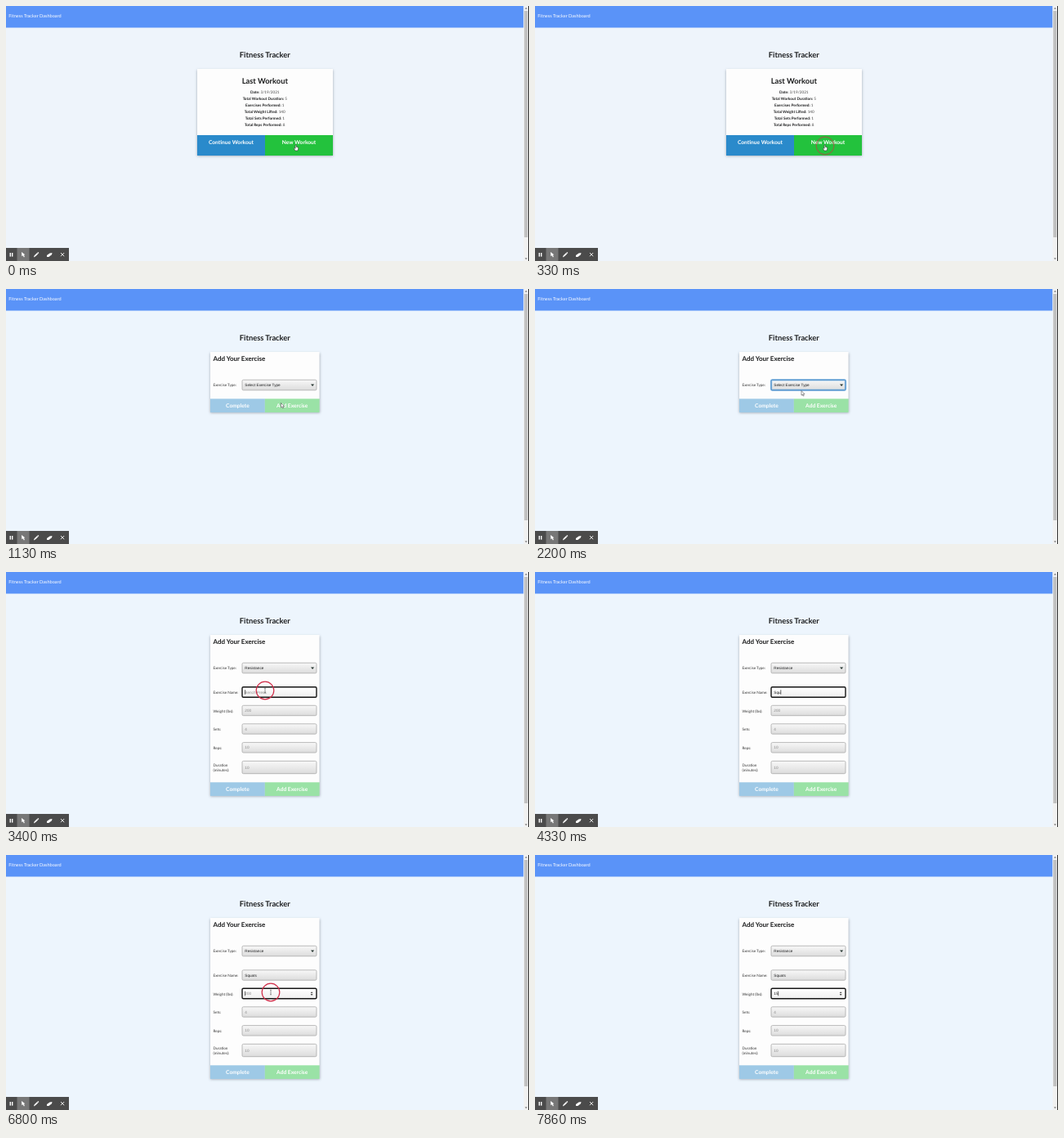
Animation, 640 px wide and 312 px high, one loop 8000 ms. Source, as an HTML page with a canvas:

```html
<!DOCTYPE html>
<html lang="en">
<head>
<meta charset="utf-8">
<title>Fitness Tracker</title>
<style>
html, body { margin: 0; width: 100%; height: 100%; overflow: hidden; background: #edf5fd; }
canvas { display: block; width: 640px; height: 312px; }
</style>
</head>
<body>
<canvas id="stage"></canvas>
<script>
const W = 640, H = 312, LOOP = 8000;
const canvas = document.getElementById('stage');
const ratio = window.devicePixelRatio || 1;
canvas.width = W * ratio;
canvas.height = H * ratio;
const ctx = canvas.getContext('2d');
ctx.scale(ratio, ratio);
if ('textRendering' in ctx) ctx.textRendering = 'geometricPrecision';

const LATO = 'Lato, sans-serif', ARIAL = '"Liberation Sans", Arial, sans-serif';
const INK = '#1b1c1d', BLUE = '#2a8acb', GREEN = '#23c23d';
const BLINK = 530;

// [time, x, y, shape]; the pointer glides between neighbouring keys
const pointerKeys = [
  [0, 355, 170, 'hand'], [1000, 355, 170, 'arrow'], [1130, 336.5, 139.5, 'arrow'],
  [1400, 326, 118, 'arrow'], [2000, 326, 118, 'arrow'], [2200, 326, 124.5, 'arrow'],
  [3130, 326, 124.5, 'arrow'], [3200, 317, 145, 'beam'], [4130, 0, 0, null],
  [6530, 318, 152, 'beam'], [6600, 324, 168, 'beam'], [7660, 0, 0, null]
];
const clicks = [[60, 355, 171, 400], [1800, 326, 118, 200], [3400, 317, 145, 200], [6800, 324, 168, 200]];
const nameKeys = [[3400, ''], [4130, 'S'], [4200, 'Sq'], [4330, 'Squ'], [4660, 'Squa'], [5060, 'Squat'], [5800, 'Squats']];
const weightKeys = [[6800, ''], [7660, '1'], [7860, '15']];

const clamp = v => Math.max(0, Math.min(1, v));
const latest = (keys, t) => keys.filter(k => k[0] <= t).pop();

function rect(x, y, w, h, fill) {
  ctx.fillStyle = fill;
  ctx.fillRect(x, y, w, h);
}

// cy is the middle of the capitals
function text(str, x, cy, size, { color = INK, weight = 400, align = 'left', family = LATO } = {}) {
  ctx.font = `${weight} ${size}px ${family}`;
  ctx.textAlign = align;
  ctx.fillStyle = color;
  ctx.fillText(str, x, cy + size * 0.36);
  return ctx.measureText(str).width;
}

function poly(points, fill, stroke, width = 0.7) {
  ctx.beginPath();
  points.forEach(([x, y]) => ctx.lineTo(x, y));
  ctx.closePath();
  if (fill) { ctx.fillStyle = fill; ctx.fill(); }
  if (stroke) { ctx.strokeStyle = stroke; ctx.lineWidth = width; ctx.stroke(); }
}

function line(x1, y1, x2, y2, color, width) {
  ctx.beginPath();
  ctx.moveTo(x1, y1);
  ctx.lineTo(x2, y2);
  ctx.strokeStyle = color;
  ctx.lineWidth = width;
  ctx.stroke();
}

function card(x, y, w, h, shadow) {
  ctx.save();
  ctx.shadowColor = `rgba(90,100,115,${0.55 * shadow})`;
  ctx.shadowBlur = 3 * ratio;
  ctx.shadowOffsetY = 0.6 * ratio;
  rect(x, y, w, h, '#fdfdfd');
  ctx.restore();
}

function buttons(x, y, w, h, labels, textY, alpha, color) {
  const half = w / 2;
  ctx.globalAlpha = alpha;
  rect(x, y, half, h, BLUE);
  rect(x + half, y, half, h, GREEN);
  ctx.globalAlpha = 1;
  labels.forEach((label, i) =>
    text(label, x + half * (i + 0.5), textY, 6.67, { color, weight: 700, align: 'center' }));
}

function home() {
  card(234, 77, 166, 106, 1);
  text('Last Workout', 316.8, 91.2, 9.33, { weight: 700, align: 'center' });
  const stats = [['Date:', '3/19/2021'], ['Total Workout Duration:', '5'], ['Exercises Performed:', '1'],
    ['Total Weight Lifted:', '140'], ['Total Sets Performed:', '1'], ['Total Reps Performed:', '8']];
  stats.forEach(([label, value], i) => {
    const size = 4.67, y = 105 + i * 8;
    ctx.font = `400 ${size}px ${LATO}`;
    const valueWidth = ctx.measureText(' ' + value).width;
    ctx.font = `700 ${size}px ${LATO}`;
    const x = 316.8 - (ctx.measureText(label).width + valueWidth) / 2;
    const labelWidth = text(label, x, y, size, { weight: 700 });
    text(' ' + value, x + labelWidth, y, size, { color: '#444' });
  });
  buttons(234, 158, 166, 25, ['Continue Workout', 'New Workout'], 167, 1, '#fff');
}

function box(cy, h, focus) {
  const y = cy - h / 2, shade = ctx.createLinearGradient(0, y, 0, y + h);
  shade.addColorStop(0, focus === 'black' ? '#fff' : '#f8f8f8');
  shade.addColorStop(1, focus === 'black' ? '#eee' : '#dcdcdc');
  ctx.beginPath();
  ctx.roundRect(289, y, 91, h, 1.5);
  ctx.fillStyle = shade;
  ctx.fill();
  if (focus === 'blue') {
    ctx.strokeStyle = 'rgba(90,165,230,.55)';
    ctx.lineWidth = 2.4;
    ctx.stroke();
  }
  ctx.strokeStyle = { blue: '#2f78b4', black: '#151515' }[focus] || '#a9a9a9';
  ctx.lineWidth = focus === 'black' ? 1.4 : 0.8;
  ctx.stroke();
}

function select(value, focused) {
  text('Exercise Type:', 253.5, 117.8, 4.6, { color: '#333' });
  box(117.5, 12.6, focused && 'blue');
  text(value, 292.3, 117.4, 4.67, { family: ARIAL });
  poly([[373, 116.6], [377.2, 116.6], [375.1, 119]], '#24352f');
}

function field(label, hint, cy, h, keys, t, focused) {
  label.split('|').forEach((part, i, all) =>
    text(part, 253.5, cy + 0.4 + (i - (all.length - 1) / 2) * 6.2, 4.6, { color: '#333' }));
  box(cy, h, focused && 'black');
  const key = keys && latest(keys, t), value = key ? key[1] : '';
  const width = text(value || hint, 292.3, cy, 4.67, { family: ARIAL, color: value ? INK : '#888' });
  if (focused && (t - key[0]) % (2 * BLINK) < BLINK)
    line(292.5 + (value ? width : 0), cy - 2.8, 292.5 + (value ? width : 0), cy + 2.8, '#111', 0.6);
}

function form(t) {
  const expanded = t >= 2800, ready = clamp((t - 600) / 200);
  const bottom = expanded ? 274 : 151, tone = Math.round(184 + 71 * ready);
  card(250, 77, 133.6, bottom - 77, ready);
  text('Add Your Exercise', 253.5, 85, 8, { weight: 700 });
  select(expanded ? 'Resistance' : 'Select Exercise Type', t >= 1930 && t < 3400);
  if (expanded) {
    field('Exercise Name:', 'Bench Press', 147, 12.4, nameKeys, t, t >= 3400 && t < 6800);
    field('Weight (lbs):', '200', 169.5, 12.4, weightKeys, t, t >= 6800);
    field('Sets:', '4', 192, 12.4);
    field('Reps:', '10', 214.8, 12.4);
    field('Duration|(minutes):', '10', 239, 15.4);
    if (t >= 6530) {
      poly([[372.7, 169], [375.5, 169], [374.1, 167.2]], '#444');
      poly([[372.7, 170.1], [375.5, 170.1], [374.1, 171.9]], '#444');
    }
  }
  buttons(250, bottom - 16.7, 133.6, 16.7, ['Complete', 'Add Exercise'], bottom - 8.4, 0.45 * ready, `rgb(${tone},${tone},${tone})`);
}

function pointer(t) {
  const i = pointerKeys.indexOf(latest(pointerKeys, t));
  const [start, x0, y0, shape] = pointerKeys[i];
  if (!shape) return;
  const next = pointerKeys[i + 1];
  const p = next && next[3] ? (t - start) / (next[0] - start) : 0;
  ctx.save();
  ctx.translate(x0 + (next ? next[1] - x0 : 0) * p, y0 + (next ? next[2] - y0 : 0) * p);
  if (shape === 'hand') {
    poly([[-0.9, 0], [0.3, 0], [0.4, 2.4], [2.6, 3], [2.7, 5], [1.9, 7], [-1.1, 7], [-2.8, 4.1], [-2.2, 3.5], [-0.9, 4.4]], '#fff', '#333', 0.6);
  } else if (shape === 'arrow') {
    poly([[0, 0], [0, 5.6], [1.3, 4.5], [2.2, 6.5], [3.2, 6], [2.3, 4.1], [4, 4]], '#fff', '#333', 0.5);
  } else {
    line(0, -2.8, 0, 2.8, '#333', 0.5);
    line(-0.9, -2.8, 0.9, -2.8, '#333', 0.5);
    line(-0.9, 2.8, 0.9, 2.8, '#333', 0.5);
  }
  ctx.restore();
}

function clickRings(t) {
  for (const [start, x, y, length] of clicks) {
    const p = (t - start) / length;
    if (p < 0 || p >= 1) continue;
    ctx.beginPath();
    ctx.arc(x, y, 10.8, 0, Math.PI * 2);
    ctx.strokeStyle = `rgba(208,44,72,${1 - p * p})`;
    ctx.lineWidth = 1.2;
    ctx.stroke();
  }
}

function scrollbar() {
  rect(633.5, 0, 6.5, H, '#f1f1f1');
  rect(634.2, 6, 4.2, 277, '#c1c1c1');
  rect(639, 0, 1, H, '#333');
  poly([[635, 3.6], [637.8, 3.6], [636.4, 2]], '#555');
  poly([[635, 308.4], [637.8, 308.4], [636.4, 310]], '#555');
}

function toolbar() {
  const white = '#fff';
  rect(0, 296, 77, 16, '#4b4b4b');
  rect(13.5, 296, 15, 16, '#777');
  rect(4.6, 302, 1.4, 4.6, white);
  rect(7, 302, 1.4, 4.6, white);
  poly([[19, 301], [19.4, 306.3], [20.7, 305.2], [21.9, 307.4], [22.9, 306.8], [21.8, 304.7], [23.3, 304.2]], white);
  line(35.1, 306.2, 38.7, 302.6, white, 1.7);
  line(39, 302.3, 39.8, 301.5, white, 1.7);
  poly([[34, 307.3], [34.4, 305.6], [35.7, 306.9]], white);
  poly([[50, 305], [53.5, 302.5], [56.5, 302], [56, 304.2], [52.4, 307], [50, 307]], white);
  line(67, 302, 71.2, 306.2, white, 0.9);
  line(71.2, 302, 67, 306.2, white, 0.9);
}

function draw(t) {
  rect(0, 0, W, H, t < 600 ? '#eef4fb' : '#edf5fd');
  rect(0, 0, 633.5, 26.5, '#5a93f8');
  text('Fitness Tracker Dashboard', 3.2, 12.3, 5.6, { color: '#fff' });
  text('Fitness Tracker', 316.8, 59.6, 9.33, { weight: 700, align: 'center' });
  if (t < 600) home(); else form(t);
  scrollbar();
  toolbar();
  pointer(t);
  clickRings(t);
}

const begin = performance.now();
function tick() {
  draw((performance.now() - begin) % LOOP);
  requestAnimationFrame(tick);
}
tick();
</script>
</body>
</html>
```
